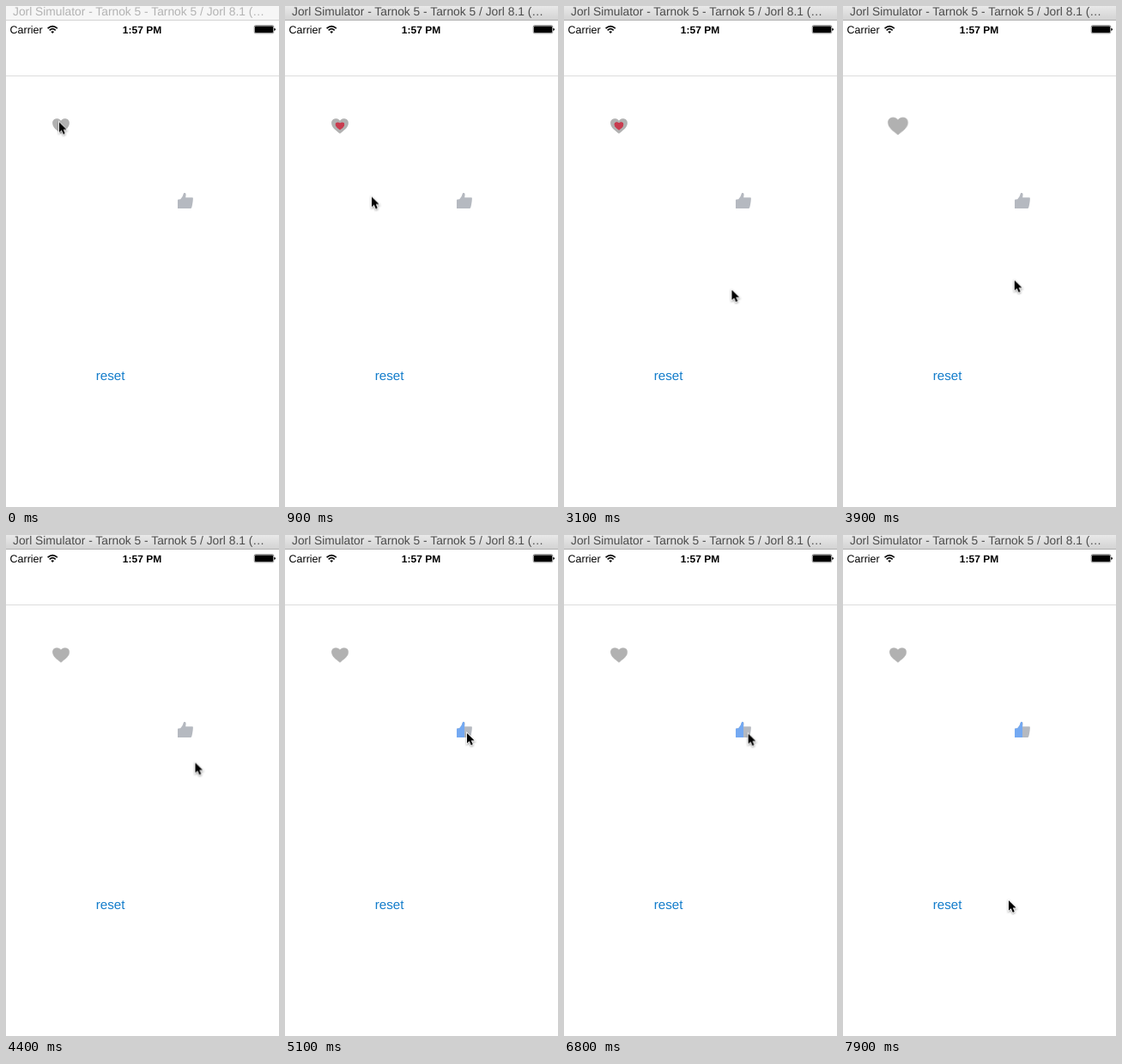
These frames come from a looping animation (318x584 px, 8 s). An HTML page:

```html
<!DOCTYPE html>
<html lang="en">
<head>
<meta charset="utf-8">
<title>Favourite buttons</title>
<style>
html, body { margin: 0; width: 100%; height: 100%; overflow: hidden; background: #fff; }
svg { display: block; width: 318px; height: 584px; font-family: "Liberation Sans", Arial, sans-serif; text-rendering: geometricPrecision; }

.anim { animation: 8s linear infinite; }
.active { animation-name: activate; animation-timing-function: step-end; }
.heart { transform-origin: 64px 140px; animation-name: heart-pop; }
.heart-fill { transform-origin: 64px 140px; animation-name: heart-fill; }
.thumb { transform-origin: 209px 227px; animation-name: thumb-pop; }
.thumb-fill { transform-origin: 200px 227px; animation-name: thumb-fill; }
.pointer { animation-name: point; animation-timing-function: ease-in-out; filter: drop-shadow(0 1px 1px rgba(0,0,0,.4)); }

@keyframes activate {
  0% { opacity: 0; }
  2.5%, 100% { opacity: 1; }
}
@keyframes heart-fill {
  0%, 3.75% { transform: scale(0); }
  6.25%, 18.75% { transform: scale(.53); }
  20%, 33.75% { transform: scale(1); }
  36.25%, 47.5% { transform: scale(.55); }
  48.75%, 100% { transform: scale(0); }
}
@keyframes heart-pop {
  0%, 18.75% { transform: scale(1); }
  21.25% { transform: scale(1.38); }
  23.75% { transform: scale(.96); }
  25%, 47.5% { transform: scale(1); }
  50% { transform: scale(1.38); }
  52.5% { transform: scale(.96); }
  54%, 100% { transform: scale(1); }
}
@keyframes thumb-fill {
  0%, 58.75% { transform: scaleX(0); }
  61.25%, 68.75% { transform: scaleX(.5); }
  70%, 78.75% { transform: scaleX(1); }
  81.25%, 86.25% { transform: scaleX(.5); }
  87.5%, 95% { transform: scaleX(0); }
  97.5%, 100% { transform: scaleX(.5); }
}
@keyframes thumb-pop {
  0%, 68.75% { transform: scale(1); }
  71.25% { transform: scale(1.38); }
  73.5% { transform: scale(.96); }
  75%, 86.25% { transform: scale(1); }
  88% { transform: scale(1.2); }
  90%, 100% { transform: scale(1); }
}
@keyframes point {
  0%, 2.5% { transform: translate(62px, 135.5px); }
  11.25%, 13.75% { transform: translate(101px, 222.5px); }
  23.75%, 25% { transform: translate(65.5px, 129px); }
  28.75%, 33.75% { transform: translate(69px, 140px); }
  38.75%, 46.25% { transform: translate(195.5px, 331px); }
  55% { transform: translate(220.5px, 265.5px); }
  56.25% { transform: translate(220px, 256px); }
  58.75%, 66.25% { transform: translate(212px, 231px); }
  71.25%, 73% { transform: translate(223px, 366px); animation-timing-function: ease-in; }
  75% { transform: translate(223px, 339px); animation-timing-function: linear; }
  76.25% { transform: translate(220px, 246px); }
  78.75%, 81.25% { transform: translate(212px, 231px); }
  87.5% { transform: translate(216px, 232px); }
  90%, 95% { transform: translate(210px, 230px); }
  98.75%, 100% { transform: translate(193px, 426px); }
}
</style>
</head>
<body>
<svg viewBox="0 0 318 584">
  <defs>
    <linearGradient id="bar" x2="0" y2="1">
      <stop stop-color="#e9e9e9"/>
      <stop offset="1" stop-color="#d3d3d3"/>
    </linearGradient>
    <path id="heart" d="M64 133.8C62.6 131.9 60.9 131.3 59.2 131.3C56.1 131.3 54.1 133.5 54.1 136.4C54.1 141.5 59.4 144.9 64 148.7C68.6 144.9 73.9 141.5 73.9 136.4C73.9 133.5 71.9 131.3 68.8 131.3C67.1 131.3 65.4 131.9 64 133.8Z"/>
    <path id="thumb" d="M200 226.4Q200 225.6 200.8 225.5L203.2 225.2Q206 222.6 206.7 218.9Q207 217.7 208 217.7Q209.6 217.9 209.6 219.8L209.2 223.2H217Q218 223.2 217.9 224.4L217.6 228L217 231.8L216.3 234.8Q216 236 214.8 236H200Z"/>
    <clipPath id="thumb-clip"><use href="#thumb"/></clipPath>
  </defs>

  <rect width="318" height="16" fill="#f6f6f6"/>
  <rect y="16" width="318" height="1" fill="#d2d2d2"/>
  <text x="8" y="11" font-size="13.8" fill="#b3b3b3">Jorl Simulator - Tarnok 5 - Tarnok 5 / Jorl 8.1 (…</text>
  <g class="anim active">
    <rect width="318" height="16" fill="url(#bar)"/>
    <rect y="16" width="318" height="1" fill="#b0b0b0"/>
    <text x="8" y="11" font-size="13.8" fill="#4c4c4c">Jorl Simulator - Tarnok 5 - Tarnok 5 / Jorl 8.1 (…</text>
  </g>

  <text x="4.5" y="32" font-size="12.5">Carrier</text>
  <g fill="none" stroke="#000" stroke-width="1.7">
    <path d="M48.6 26.2Q54.2 20.9 59.8 26.2"/>
    <path d="M50.7 28.3Q54.2 25 57.7 28.3"/>
  </g>
  <path d="M54.2 32L52.3 30Q54.2 28.4 56.1 30Z"/>
  <text x="135.8" y="32" font-size="12" font-weight="bold">1:57 PM</text>
  <rect x="289.25" y="22.75" width="22.5" height="9" rx="1.5" fill="none" stroke="#000" stroke-width=".5"/>
  <rect x="290" y="23.4" width="21" height="7.7" rx=".8"/>
  <path d="M312.3 25.7Q314 26 314 27.3T312.3 28.9Z"/>
  <rect y="81" width="318" height="1" fill="#dcdcdc"/>

  <g class="anim heart">
    <use href="#heart" fill="#b1b1b1"/>
    <use class="anim heart-fill" href="#heart" fill="#c83c4f"/>
  </g>
  <g class="anim thumb">
    <use href="#thumb" fill="#b5b9c0"/>
    <g clip-path="url(#thumb-clip)">
      <rect class="anim thumb-fill" x="200" y="217" width="18" height="20" fill="#74a9f2"/>
    </g>
  </g>

  <text x="104.7" y="436" font-size="15.2" fill="#147dcb">reset</text>

  <path class="anim pointer" d="M0 0V11.8L2.8 9.3L4.8 14L6.8 13.1L4.8 8.6H8.6Z" stroke="#fff" stroke-width="1.6" paint-order="stroke"/>
</svg>
</body>
</html>
```
